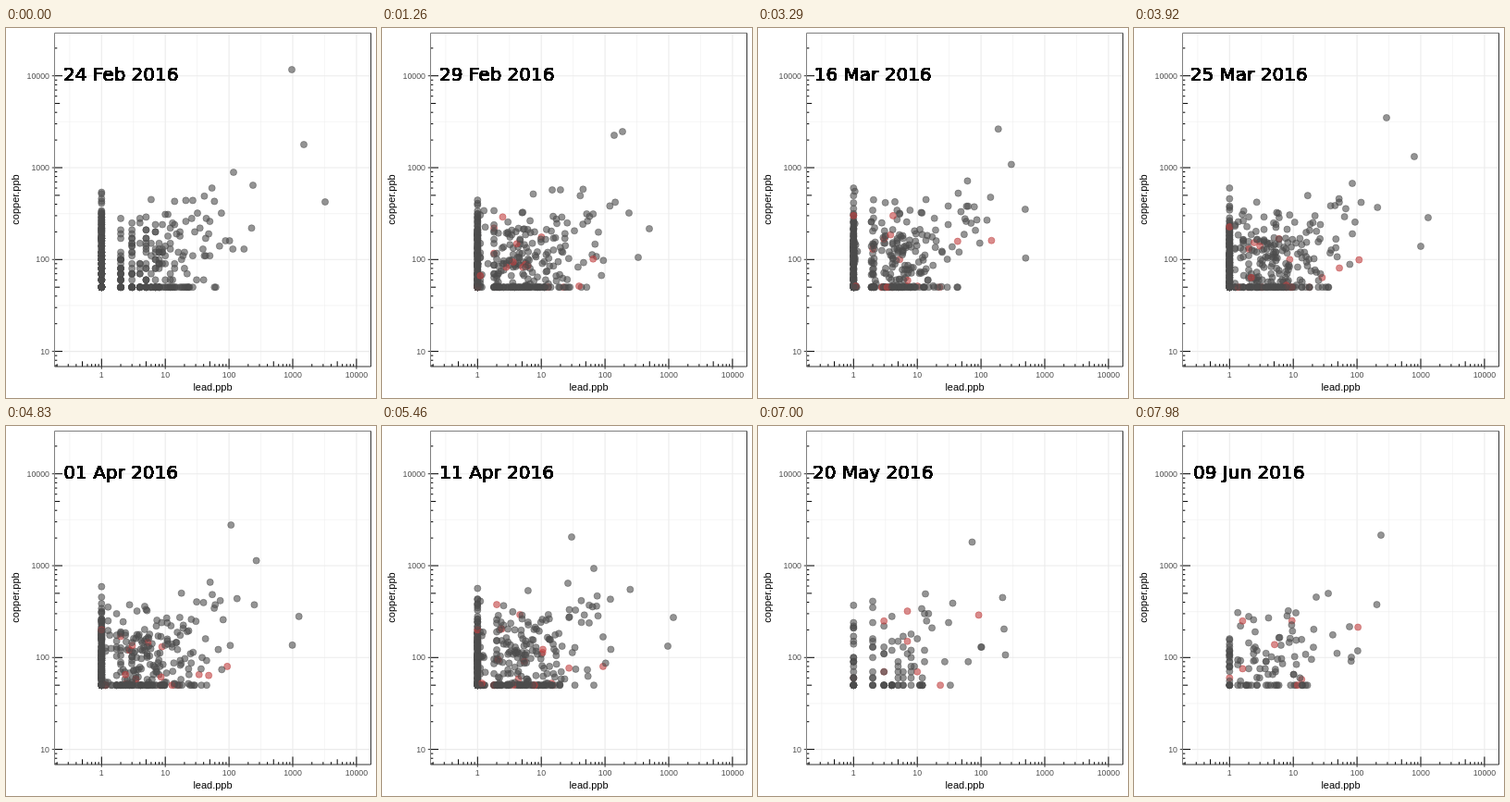
An HTML page with a canvas that plays this animation: 400x400 px, repeating every 8 s.

```html
<!DOCTYPE html>
<html lang="en">
<head>
<meta charset="utf-8">
<title>Copper and lead by date</title>
<style>
  html, body { margin: 0; width: 100%; height: 100%; overflow: hidden; background: #fff; }
  canvas { display: block; }
</style>
</head>
<body>
<canvas id="stage" width="400" height="400"></canvas>
<script>
const ctx = document.getElementById('stage').getContext('2d');

// Timing: each round rests, then moves in equal steps to the next one.
const LOOP = 8000, ROUND = 1400, REST = 490, STEP = 70, STEPS = 14;
const ROUND_STARTS = [0, 1, 2, 3, 4, 5, 6].map(i => i * STEPS);
const DAYS = [0, 6, 20, 34, 50, 86, 122];       // days after 24 Feb 2016
const SPARSE_FROM = 4 * STEPS + 1;              // from here fewer sites are sampled

const PANEL = { left: 52.5, top: 5.5, right: 394.5, bottom: 366 };
const GREY = '#4d4d4d', RED = '#c04040';
const xOf = lead => 103.3 + 68.9 * Math.log10(lead);
const yOf = copper => 250.3 - 99.3 * Math.log10(copper / 100);
const mix = (a, b, u) => a + (b - a) * u;
const clamp = (v, low, high) => Math.min(high, Math.max(low, v));

let seed = 2016;
function random() {
  seed = (seed + 0x6D2B79F5) | 0;
  let t = Math.imul(seed ^ (seed >>> 15), 1 | seed);
  t = (t + Math.imul(t ^ (t >>> 7), 61 | t)) ^ t;
  return ((t ^ (t >>> 14)) >>> 0) / 4294967296;
}
const normal = () => Math.sqrt(-2 * Math.log(1 - random())) * Math.cos(2 * Math.PI * random());

// A site varies around its own level; lead is a whole number, copper a multiple of ten.
function makeSites({ count, lasting, lead, spread, copper, floorShare, redEvery }) {
  return Array.from({ length: count }, (_, i) => {
    const leadLevel = lead * Math.exp(spread * normal());
    const copperLevel = random() < floorShare ? 0 : copper * Math.exp(0.55 * normal());
    const track = ROUND_STARTS.map(() => {
      const leadNow = Math.round(leadLevel * Math.exp(0.6 * spread * normal()));
      const copperNow = 10 * Math.round(copperLevel * Math.exp(0.35 * normal()) / 10);
      return [xOf(clamp(leadNow, 1, 250)), yOf(clamp(copperNow, 50, 600))];
    });
    return { track, lasting: i < lasting, red: i % redEvery === 1 };
  });
}
const sites = [
  { count: 165, lasting: 12, lead: 1, spread: 0, copper: 95, floorShare: 0.15, redEvery: Infinity },
  { count: 265, lasting: 95, lead: 3.6, spread: 0.9, copper: 95, floorShare: 0.28, redEvery: 18 },
  { count: 24, lasting: 7, lead: 45, spread: 0.6, copper: 210, floorShare: 0.1, redEvery: 12 }
].flatMap(makeSites);

// The five most extreme samples, in plot coordinates at some steps.
const EXTREMES = {
  0: [[309, 45], [322, 126], [345, 188], [267, 170], [246, 156]],
  12: [[251, 116], [260, 112], [289, 217], [277, 248], [267, 200]],
  21: [[248, 120], [248, 155], [263, 188], [271, 260], [218, 163]],
  38: [[273, 97], [303, 139], [318, 205], [310, 236], [236, 168]],
  54: [[205, 120], [229, 154], [315, 207], [309, 238], [201, 170]],
  62: [[196, 133], [165, 178], [299, 222], [300, 245], [179, 193]],
  78: [[267, 118], [197, 185], [233, 217], [235, 250], [175, 202]]
};
const EXTREME_STEPS = Object.keys(EXTREMES).map(Number);

// Index of the interval holding p, and the fraction covered.
function locate(keys, p) {
  let k = 0;
  while (k < keys.length - 2 && p >= keys[k + 1]) k++;
  return { k, u: (p - keys[k]) / (keys[k + 1] - keys[k]) };
}

function line(x1, y1, x2, y2, color, width = 1) {
  ctx.strokeStyle = color;
  ctx.lineWidth = width;
  ctx.beginPath();
  ctx.moveTo(x1, y1);
  ctx.lineTo(x2, y2);
  ctx.stroke();
}

function label(text, x, y, size, color, align = 'center') {
  ctx.font = `${size}px "Liberation Sans", Arial, sans-serif`;
  ctx.fillStyle = color;
  ctx.textAlign = align;
  ctx.fillText(text, x, y);
}

function dot(a, b, u, color) {
  ctx.globalAlpha = 0.6;
  ctx.fillStyle = ctx.strokeStyle = color;
  ctx.lineWidth = 0.75;
  ctx.beginPath();
  ctx.arc(mix(a[0], b[0], u), mix(a[1], b[1], u), 3.55, 0, 2 * Math.PI);
  ctx.fill();
  ctx.stroke();
  ctx.globalAlpha = 1;
}

function drawGrid() {
  const { left, top, right, bottom } = PANEL;
  for (let half = -1; half <= 8; half++) {
    const value = 10 ** (half / 2), width = half % 2 ? 0.5 : 1.07;
    const x = xOf(value), y = yOf(value);
    if (x > left && x < right) line(x, top, x, bottom, '#ebebeb', width);
    if (y > top && y < bottom) line(left, y, right, y, '#ebebeb', width);
  }
}

function drawAxes() {
  const { left, top, right, bottom } = PANEL;
  for (let decade = -1; decade <= 4; decade++) {
    for (let m = 1; m <= 9; m++) {
      const value = m * 10 ** decade, x = xOf(value), y = yOf(value);
      const length = m === 1 ? 8.5 : m === 5 ? 5.7 : 2.8;
      if (x > left && x < right) line(x, bottom, x, bottom - length, '#000');
      if (y > top && y < bottom) line(left, y, left + length, y, '#000');
    }
    const value = 10 ** decade, x = xOf(value), y = yOf(value);
    if (x > left) {
      line(x, bottom, x, bottom + 2.75, '#333');
      label(value, x, 378, 8.8, GREY);
    }
    if (y < bottom) {
      line(left - 2.75, y, left, y, '#333');
      label(value, 47, Math.round(y + 3), 8.8, GREY, 'right');
    }
  }
  line(left, top, right, top, '#7f7f7f');
  line(left, top, left, bottom, '#7f7f7f');
  line(right, top, right, bottom, '#333');
  line(left, bottom, right, bottom, '#333');

  label('lead.ppb', 223.5, 391.5, 11, '#000');
  ctx.save();
  ctx.translate(13.5, 185.5);
  ctx.rotate(-Math.PI / 2);
  label('copper.ppb', 0, 0, 11, '#000');
  ctx.restore();
}

function drawDots(p) {
  const round = locate(ROUND_STARTS, p);
  for (const { track, lasting, red } of sites) {
    if (p >= SPARSE_FROM && !lasting) continue;
    dot(track[round.k], track[round.k + 1], round.u, red && p > 0 ? RED : GREY);
  }
  const { k, u } = locate(EXTREME_STEPS, p);
  const from = EXTREMES[EXTREME_STEPS[k]], to = EXTREMES[EXTREME_STEPS[k + 1]];
  from.forEach((a, i) => dot(a, to[i], u, GREY));
}

function drawDate(p) {
  const { k, u } = locate(ROUND_STARTS, p);
  const days = Math.floor(mix(DAYS[k], DAYS[k + 1], u) + 1e-6);
  const date = new Date(Date.UTC(2016, 1, 24 + days));
  const month = ['Jan', 'Feb', 'Mar', 'Apr', 'May', 'Jun'][date.getUTCMonth()];
  const text = `${String(date.getUTCDate()).padStart(2, '0')} ${month} 2016`;
  ctx.font = '20px "DejaVu Sans", sans-serif';
  ctx.fillStyle = '#000';
  ctx.textAlign = 'center';
  // Repeated printing hardens the edges of the letters.
  for (let i = 0; i < 40; i++) ctx.fillText(text, 124.2, 57.2);
}

function draw() {
  const time = performance.now() % LOOP;
  const inRound = time % ROUND;
  const step = inRound < REST ? 0 : Math.floor((inRound - REST) / STEP) + 1;
  const p = Math.floor(time / ROUND) * STEPS + step;

  ctx.fillStyle = '#fff';
  ctx.fillRect(0, 0, 400, 400);
  drawGrid();
  drawDots(p);
  drawDate(p);
  drawAxes();
  requestAnimationFrame(draw);
}
draw();
</script>
</body>
</html>
```
